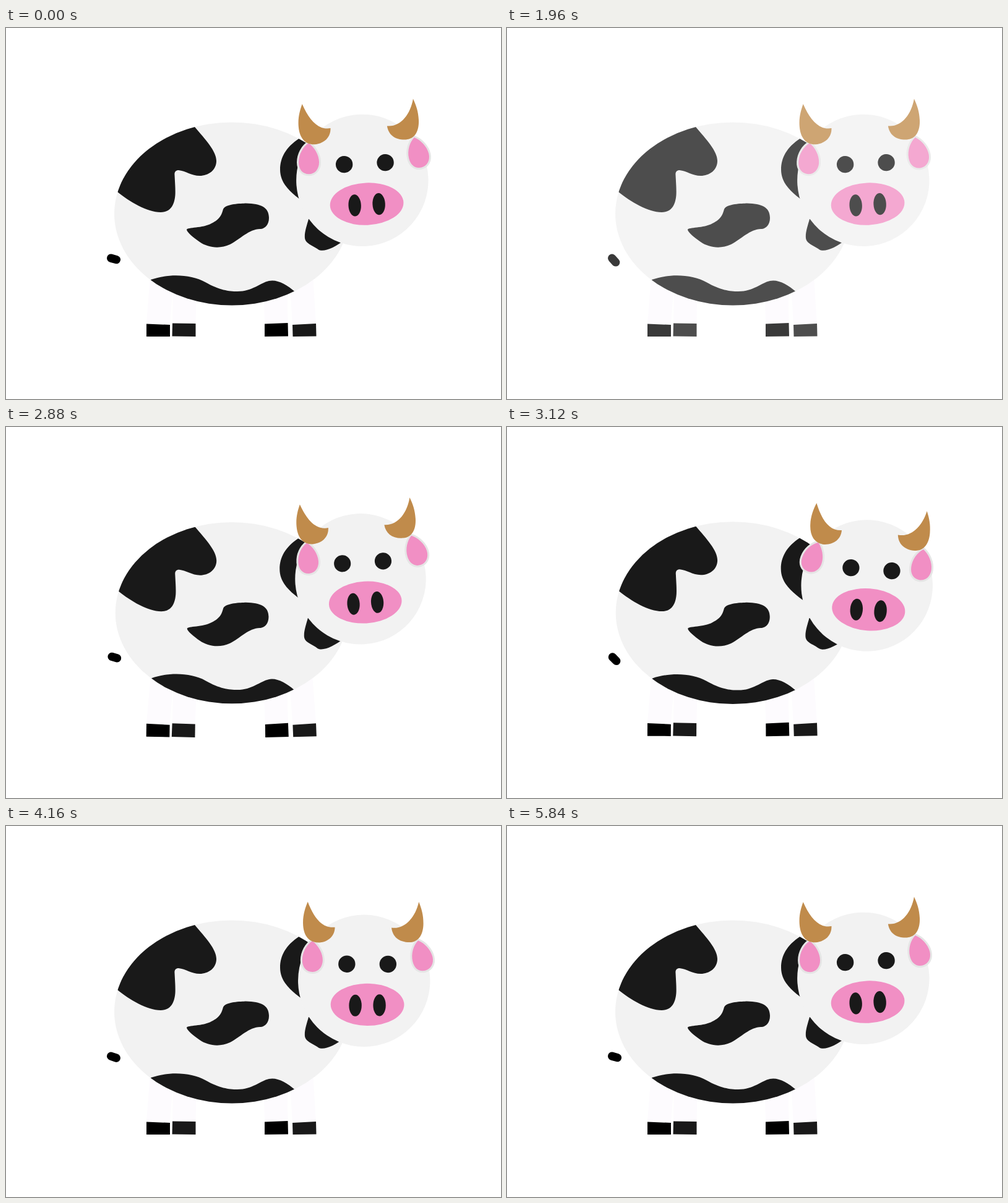
Animation of 800 by 600 pixels, one loop 5880 ms. Source, as an HTML page:

```html
<!DOCTYPE html>
<html lang="en">
<head>
<meta charset="utf-8">
<title>Cow</title>
<style>
  html, body { margin: 0; width: 100%; height: 100%; overflow: hidden; background: #fff; }
  svg { display: block; width: 800px; height: 600px; }
  .dark { fill: #191919; }
  .pale { fill: #f2f2f2; }
  .leg { fill: #fdfbfe; }
  .pink { fill: #f18fc4; }
  .horn { fill: #c08b4b; }
  .ear { fill: #f18fc4; stroke: #e5e5e5; stroke-width: 6; paint-order: stroke; }
</style>
</head>
<body>
<svg viewBox="0 0 800 600">
  <defs>
    <clipPath id="bodyClip"><ellipse cx="365" cy="300.5" rx="190" ry="148"/></clipPath>
    <path id="drop" d="M0 0C9 6 17 19 17 31C17 42 10 50 .5 50C-10 50 -16 42 -16 31C-16 18 -9 6 0 0Z"/>
  </defs>
  <g id="cow">
    <line id="tail" x1="0" y1="0" x2="9" y2="0" stroke="#000" stroke-width="13.4" stroke-linecap="round"/>

    <g id="backLegs">
      <path class="leg" d="M233 400H271L265 480L227 478.5ZM270 400H308L306.5 478L269 477.5Z"/>
      <path d="M227 478.5L265 480V499H227Z"/>
      <path class="dark" d="M269 477.5L306.5 478V499L268.5 498.5Z"/>
    </g>
    <g id="frontLegs">
      <path class="leg" d="M416 400H454L455.5 477L418 478.5ZM458 400H496L501 478L463 480Z"/>
      <path d="M418 478.5L455.5 477L456 498.5L418 499Z"/>
      <path class="dark" d="M463 480L501 478L501.5 498.5L463.5 499Z"/>
    </g>

    <ellipse class="pale" cx="365" cy="300.5" rx="190" ry="148"/>
    <g class="dark" clip-path="url(#bodyClip)">
      <path d="M305 160C322 180 340 199 340 215C340 230 327 239 313 239C300 239 290 231 279 230C274 230 272 233 272.5 238C273 249 274 260 273.5 270C272 290 263 298 250 298C228 298 200 281 180 265L150 240L180 150Z"/>
      <path d="M292 326C293 322 318 324 332 316C347 309 349 300 351 293C355 284 380 284 388 283.5C412 284 425 290 425 307C425 318 419 324 412 325C394 324 378 342 362 350C345 358 326 355 313 346C303 339 292 330 292 326Z"/>
      <path d="M474 178.5C452 193 443 210 443 229C443 255 465 270 490 288L540 235L520 160Z"/>
      <path d="M489 309C486 320 482 331 483 340C484 349 497 352 505 358.5C513 363 531 356 549 341L540 310Z"/>
      <path d="M234 407C262 397 299 398 322 411C345 424 360 426 374 426C398 426 411 412 425 409C438 406 454 415 467 426.5L460 470H240Z"/>
    </g>

    <g id="head">
      <circle class="pale" cx="578.5" cy="250" r="106.7"/>
      <use id="leftEar" class="ear" href="#drop"/>
      <use id="rightEar" class="ear" href="#drop"/>
      <path class="horn" d="M487 122.5C497 148 510 166 531 163.5C531 178 520 188 504 188.5C488 188 480 176 479.5 158C479 144 483 132 487 122.5Z"/>
      <path class="horn" d="M666.5 122C661 147 644 167 622.5 164C624 178 634 187.5 652 187.5C667 187 674 174 674 157C674 143 671 133 666.5 122Z"/>
      <circle class="dark" cx="550.5" cy="223" r="13.7"/>
      <circle class="dark" cx="617" cy="223" r="13.7"/>
      <ellipse class="pink" cx="584" cy="288.5" rx="59.4" ry="34.2"/>
      <ellipse class="dark" cx="564.5" cy="290" rx="10.2" ry="17.6"/>
      <ellipse class="dark" cx="603.5" cy="289.5" rx="10.2" ry="17.6"/>
    </g>
  </g>
</svg>
<script>
const LOOP = 5880, FADE = 1824, FADE_LEN = 600, POP = 2446, LEGS = 2627;
const REST = -2.6;

// [time, degrees] pairs, eased with a half cosine between neighbours
const headKeys = [
  [0, REST], [2445, REST], [2446, -17], [2600, -10], [2690, 15.5], [2735, 18], [2920, -6],
  [3120, 4.3], [3330, -4], [3500, REST], [3640, REST], [3900, 9.2],
  [4430, -9.2], [4850, -9.2], [5350, REST], [LOOP, REST]
];
const earKeys = [
  [0, 2.6], [300, 8], [600, 6], [2446, 6], [2680, -13], [3120, 16],
  [3400, 0], [3640, 6], [3900, -10], [4160, 0], [4640, 13], [5000, 12],
  [5400, 6], [5640, -1], [5860, 2.6], [LOOP, 2.6]
];
const tailKeys = [[0, 0], [2445, 0], [2446, 1], [2690, 1], [2900, 0], [LOOP, 0]];

const parts = {};
for (const el of document.querySelectorAll('svg [id]')) parts[el.id] = el;
const place = (id, transform) => parts[id].setAttribute('transform', transform);

function at(keys, t) {
  const i = keys.findIndex(k => k[0] > t);
  if (i < 1) return keys[keys.length - 1][1];
  const [t0, a] = keys[i - 1], [t1, b] = keys[i];
  return a + (b - a) * (1 - Math.cos(Math.PI * (t - t0) / (t1 - t0))) / 2;
}

// Springs from 0 past 1 and settles; already settled before the fade ends
function spring(t, start) {
  if (t < POP) return 1;
  const x = (t - start) / 1000;
  return x <= 0 ? 0 : 1 - Math.exp(-7.7 * x) * Math.cos(17.45 * x);
}

const about = (x, y, move) => `translate(${x} ${y}) ${move} translate(${-x} ${-y})`;

function opacity(t) {
  if (t < FADE || t >= POP) return 1;
  return Math.max(0, 1 - (t - FADE) / FADE_LEN);
}

function draw(t) {
  parts.cow.setAttribute('opacity', opacity(t));
  place('cow', about(365, 320, `scale(${spring(t, POP)})`));

  const stretch = spring(t, LEGS);
  const lean = 22.5 * (1 - stretch);
  place('backLegs', about(266, 394, `scale(1 ${stretch}) rotate(${-lean})`));
  place('frontLegs', about(459, 394, `scale(1 ${stretch}) rotate(${lean})`));

  const lift = at(tailKeys, t);
  const swing = 35 - 20 * Math.cos(2 * Math.PI * (t / 588 + 0.03));
  const angle = swing + (12 - swing) * lift;
  place('tail', `translate(${169.7 - 22 * lift} ${372.2 - 19 * lift}) rotate(${angle})`);

  place('head', `rotate(${at(headKeys, t)} 496.5 307)`);
  const ear = at(earKeys, t);
  place('leftEar', `translate(494.5 186) rotate(${ear})`);
  place('rightEar', `translate(665.5 184.5) rotate(${ear - 13})`);
}

const begin = performance.now();
function tick() {
  draw((performance.now() - begin) % LOOP);
  requestAnimationFrame(tick);
}
tick();
</script>
</body>
</html>
```
